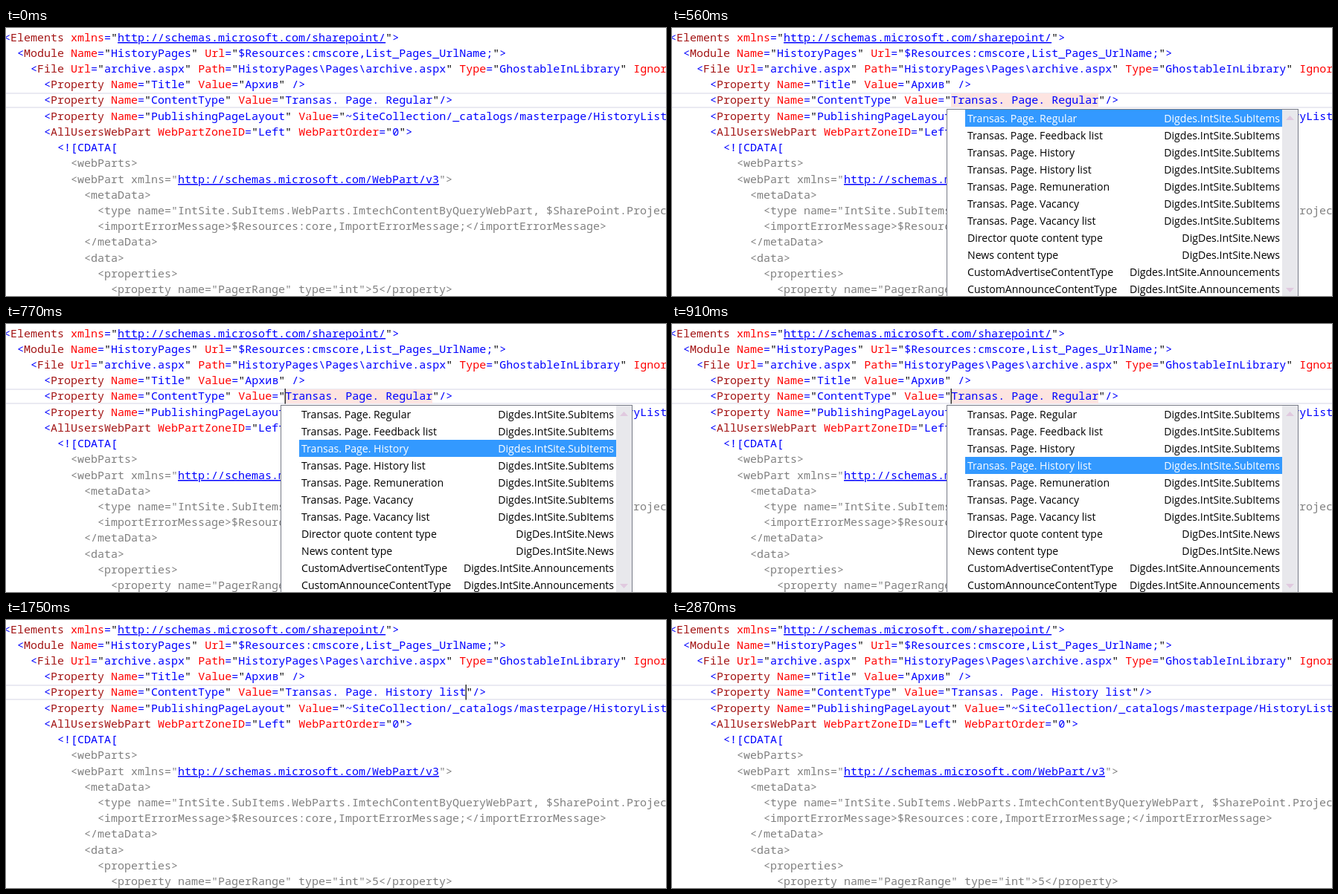
An HTML page for the animation above (3.08 s loop, 887x361 px).

```html
<!DOCTYPE html>
<html lang="en">
<head>
<meta charset="utf-8">
<style>
  html, body { margin: 0; width: 100%; height: 100%; overflow: hidden; background: #fff; }
  svg { display: block; width: 887px; height: 361px; }
  text { white-space: pre; }
  .code { font: 15px "Noto Sans Mono", monospace; }
  .list { font: 14.1px "Open Sans", sans-serif; }
</style>
</head>
<body>
<svg id="stage" viewBox="0 0 887 361"></svg>
<script>
const LOOP = 3080, CHAR = 9, LEFT = -3, ROW = 23;
const BLUE = '#0000ff', GRAY = '#808080', MAROON = '#a31515';

// [indent, text, colour of text without syntax colouring]
const lines = [
  [0, '<Elements xmlns="http://schemas.microsoft.com/sharepoint/">'],
  [2, '<Module Name="HistoryPages" Url="$Resources:cmscore,List_Pages_UrlName;">'],
  [4, '<File Url="archive.aspx" Path="HistoryPages\\Pages\\archive.aspx" Type="GhostableInLibrary" Ignor'],
  [6, '<Property Name="Title" Value="Архив" />'],
  [6, ''],
  [6, '<Property Name="PublishingPageLayout" Value="~SiteCollection/_catalogs/masterpage/HistoryList'],
  [6, '<AllUsersWebPart WebPartZoneID="Left" WebPartOrder="0">'],
  [8, '<![CDATA[', BLUE],
  [10, '<webParts>', GRAY],
  [10, '<webPart xmlns="http://schemas.microsoft.com/WebPart/v3">', GRAY],
  [12, '<metaData>', GRAY],
  [14, '<type name="IntSite.SubItems.WebParts.ImtechContentByQueryWebPart, $SharePoint.Projec', GRAY],
  [14, '<importErrorMessage>$Resources:core,ImportErrorMessage;</importErrorMessage>', GRAY],
  [12, '</metaData>', GRAY],
  [12, '<data>', GRAY],
  [14, '<properties>', GRAY],
  [16, '<property name="PagerRange" type="int">5</property>', GRAY]
];
const pages = ['Regular', 'Feedback list', 'History', 'History list', 'Remuneration', 'Vacancy', 'Vacancy list'];
const items = [
  ...pages.map(page => ['Transas. Page. ' + page, 'Digdes.IntSite.SubItems']),
  ['Director quote content type', 'DigDes.IntSite.News'],
  ['News content type', 'DigDes.IntSite.News'],
  ['CustomAdvertiseContentType', 'Digdes.IntSite.Announcements'],
  ['CustomAnnounceContentType', 'Digdes.IntSite.Announcements']
];

function add(parent, tag, attrs, content = '') {
  const node = document.createElementNS('http://www.w3.org/2000/svg', tag);
  for (const key in attrs) node.setAttribute(key, attrs[key]);
  node.textContent = content;
  return parent.appendChild(node);
}
const rect = (parent, x, y, width, height, fill) => add(parent, 'rect', { x, y, width, height, fill });
const show = (node, on) => node.setAttribute('visibility', on ? 'visible' : 'hidden');

function tokenColor(token, before) {
  if (before.endsWith('<')) return MAROON;
  if (before.endsWith('="')) return BLUE;
  if (token === '"') return '#000';
  return /^\w/.test(token) ? '#ff0000' : BLUE;
}

function fillCode(node, text, plain) {
  node.textContent = '';
  const pattern = plain ? /http[^"]*|.+?(?=http|$)/g : /(?<=<)\w+|(?<==")[^"]+|\w+|"|[^\w"]+/g;
  for (const { 0: token, index } of text.matchAll(pattern)) {
    const link = token.startsWith('http');
    const fill = link ? BLUE : plain || tokenColor(token, text.slice(0, index));
    add(node, 'tspan', { fill, 'text-decoration': link ? 'underline' : 'none' }, token);
  }
}

const stage = document.getElementById('stage');
rect(stage, 0, 87, 887, 2, '#eaeaf2');
rect(stage, 0, 106, 887, 2, '#eaeaf2');
const selection = rect(stage, 375, 88, 198, 19, '#fde4e1');

const codeNodes = lines.map(([indent, text, plain], i) => {
  const y = Math.round(17.6 + 21.22 * i);
  const node = add(stage, 'text', { class: 'code', x: LEFT + CHAR * indent, y });
  fillCode(node, text, plain);
  return node;
});
const caret = rect(stage, 374, 87, 1.5, 20.5, '#333');
const beam = rect(stage, 406, 112, 1, 14, '#fff');

const popup = add(stage, 'g', {});
add(popup, 'rect', { x: 369.5, y: 109.5, width: 472, height: 260, fill: '#fff', stroke: '#777b87' });
rect(popup, 820, 110, 21, 251, '#e8e8ec');
for (const d of ['M825 124h11l-5.5-6z', 'M825 350h11l-5.5 6z']) add(popup, 'path', { d, fill: '#e0c9df' });
const highlight = rect(popup, 394, 110, 426, ROW, '#3399ff');
const rows = items.map(([name, group], i) => {
  const y = 127 + ROW * i;
  const row = add(popup, 'g', { class: 'list' });
  add(row, 'text', { x: 397, y }, name);
  add(row, 'text', { x: 817, y, 'text-anchor': 'end' }, group);
  return row;
});
const pointer = add(stage, 'path', {
  d: 'M404.5 113.5v16l3.7-3.5 2.6 6 2.5-1.1-2.5-5.9h5.2z', fill: '#fff', stroke: '#222'
});

let shownValue;
function render(t) {
  const within = (from, to) => t >= from && t < to;
  const open = within(70, 1750);
  const done = t >= 1750;
  const value = 'Transas. Page. ' + (done ? 'History list' : 'Regular');
  if (value !== shownValue) {
    fillCode(codeNodes[4], `<Property Name="ContentType" Value="${value}"/>`);
    shownValue = value;
  }

  show(popup, open);
  show(selection, open);
  show(pointer, within(140, 210));
  show(beam, !open && t < 2380);
  caret.setAttribute('x', done ? 617.5 : 374.5);
  show(caret, [[70, 560], [700, 980], [1470, 1960], [2450, 2870]].some(span => within(...span)));

  const selected = [630, 770, 910].filter(time => t >= time).length;
  highlight.setAttribute('y', 110 + ROW * selected);
  rows.forEach((row, i) => row.setAttribute('fill', i === selected ? '#fff' : '#000'));
}

function tick() {
  render(performance.now() % LOOP);
  requestAnimationFrame(tick);
}
tick();
</script>
</body>
</html>
```
